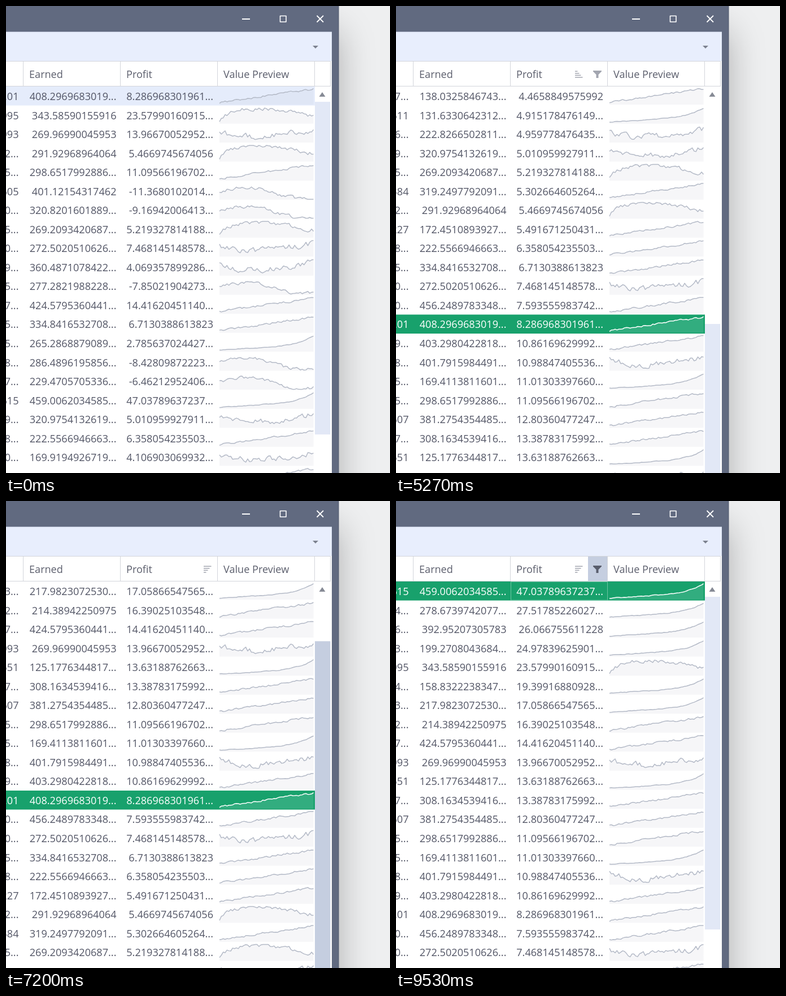
These frames come from a looping animation (680x824 px, 9740 ms). An HTML page with a canvas:

```html
<!DOCTYPE html>
<html lang="en">
<head>
<meta charset="utf-8">
<title>Sorting a data grid</title>
<style>
  html, body { margin: 0; width: 100%; height: 100%; overflow: hidden; background: #eeeff0; }
  canvas { display: block; }
</style>
</head>
<body>
<canvas id="stage" width="680" height="824"></canvas>
<script>
const ctx = document.getElementById('stage').getContext('2d');
const LOOP = 9740;
const ROW_TOP = 142, ROW_HEIGHT = 33.54, VISIBLE_ROWS = 21;
const THUMB_TOP = 169, THUMB_HEIGHT = 587, THUMB_PER_ROW = 19.6;
const GREEN = '#18a16c', HOT = '#c5cee0', LINE = '#d3d5db', ICON = '#a3a6b0';

// Visible cell text: end of the clipped column, earned, profit, sparkline shape.
const cells = `
.01 408.2969683019 8.286968301961 rise
995 343.58590155916 23.57990160915 hump
993 269.96990045953 13.96670052952 dip
2 291.92968964064 5.4669745674056 hump
5 298.6517992886 11.09566196702 rise
605 401.12154317462 -11.3680102014 fall
0 320.8201601889 -9.16942006413 fall
5 269.2093420687 5.219327814188 hump
0 272.5020510626 7.468145148578 dip
9 360.4871078422 4.069357899286 dip
5 277.2821988228 -7.85021904273 fall
7 424.5795360441 14.41620451140 rise
5 334.8416532708 6.7130388613823 rise
5 265.2868879089 2.785637024427 late
8 286.4896195856 -8.42809872223 fall
7 229.4705705336 -6.46212952406 fall
615 459.0062034585 47.03789637237 late
9 320.9754132619 5.010959927911 dip
8 222.5566946663 6.358054235503 rise
0 169.9194926719 4.106903069932 dip
227 172.4510893927 5.491671250431 rise
7 138.0325846743 4.4658849575992 rise
511 131.6330642312 4.915178476149 late
6 222.8266502811 4.959778476435 dip
384 319.2497792091 5.302664605264 rise
0 456.2489783348 7.593555983742 rise
9 403.2980422818 10.86169629992 rise
8 401.7915984491 10.98847405536 dip
5 169.4113811601 11.01303397660 late
607 381.2754354485 12.80360477247 rise
7 308.1634539416 13.38783175992 rise
551 125.1776344817 13.63188762663 late
2 214.38942250975 16.39025103548 rise
3 217.9823072530 17.05866547565 late
4 158.8322238347 19.39916880928 late
3 199.2708043684 24.97839625901 late
6 392.95207305783 26.066755611228 late
4 278.6739742077 27.51785226027 late
7 363.0895288527 4.167434249001 rise
4 248.1360927514 3.518204967315 rise
1 311.7482065193 1.940682753108 dip
8 204.9350718426 0.871936402575 hump
3 352.0617493805 -1.62480759314 fall`;

// Sparkline height in pixels over t = 0..1, with its roughness.
const shapes = {
  late: { jitter: 1.2, height: t => 2 + 10 * t + 15 * t ** 6 },
  rise: { jitter: 3, height: t => 3 + 24 * t },
  hump: { jitter: 6, height: t => 5 + 18 * Math.sin(Math.PI * t ** .65) + 8 * t },
  dip: { jitter: 9, height: t => 21 - 12 * Math.sin(Math.PI * t ** .7) + 2 * t },
  fall: { jitter: 5, height: t => 13 + 9 * Math.sin(1.7 * Math.PI * t) - 3 * t }
};

function seededRandom(seed) {
  let s = seed * 7919 + 17;
  return () => (s = (s * 16807) % 2147483647) / 2147483647;
}

function sparkline(shape, seed) {
  const { jitter, height } = shapes[shape];
  const random = seededRandom(seed);
  let drift = 0;
  return Array.from({ length: 51 }, (_, i) => {
    drift = .5 * drift + jitter * (random() - .5);
    return Math.max(0, Math.min(28, height(i / 50) + drift));
  });
}

const shorten = (value, fits) => value.length < fits ? value + '...' : value;

const rows = cells.trim().split('\n').map((line, i) => {
  const [tail, earned, profit, shape] = line.split(' ');
  return {
    tail: shorten(tail, 3),
    earned: shorten(earned, 15),
    profit: shorten(profit, 15),
    spark: sparkline(shape, i + 1)
  };
});
const descending = [...rows].sort((a, b) => parseFloat(b.profit) - parseFloat(a.profit));

const ASC_FIRST = 29, ASC_OFFSET = 20, DESC_OFFSET = 17;
const dragOffset = step => Math.max(0, Math.round(DESC_OFFSET - 2.2 * Math.max(0, step)));

function stateAt(t) {
  const between = (from, to) => t >= from && t < to;
  const sort = t < 2200 ? 'none' : t < 5600 ? 'asc' : 'desc';
  // While the thumb is dragged, the rows follow one step behind it.
  const step = Math.floor((t - 6863) / 66.7);
  const top = dragOffset(step);
  return {
    sort,
    thumb: { none: 0, asc: ASC_OFFSET, desc: dragOffset(step + 1) }[sort],
    rowAt: i => sort === 'none' ? rows[i] : descending[sort === 'asc' ? ASC_FIRST - i : top + i],
    selected: t < 8330 ? rows[0] : descending[0],
    active: t >= 870,
    cellFocused: t >= 8330,
    headerHover: between(1200, 3330) || between(5270, 6130) || t >= 9530,
    headerPressed: between(2000, 2200) || between(5530, 5600),
    filterHot: t >= 9530,
    thumbHot: between(6470, 7870)
  };
}

function rect(color, x, y, w, h) {
  ctx.fillStyle = color;
  ctx.fillRect(x, y, w, h);
}

function path(points) {
  ctx.beginPath();
  points.forEach(([x, y]) => ctx.lineTo(x, y));
}

function fill(color, ...points) {
  path(points);
  ctx.fillStyle = color;
  ctx.fill();
}

function stroke(color, width, ...points) {
  path(points);
  ctx.strokeStyle = color;
  ctx.lineWidth = width;
  ctx.stroke();
}

function frame(color, x, y, w, h, width = 1) {
  ctx.strokeStyle = color;
  ctx.lineWidth = width;
  ctx.strokeRect(x, y, w, h);
}

function text(value, x, y, color, align = 'left') {
  ctx.fillStyle = color;
  ctx.textAlign = align;
  ctx.fillText(value, x, y);
}

function drawWindow() {
  rect('#eeeff0', 0, 0, 680, 824);
  ctx.save();
  ctx.shadowColor = 'rgba(0,0,0,.27)';
  ctx.shadowBlur = 58;
  ctx.shadowOffsetY = 45;
  rect('#535b6f', -300, 0, 889.5, 1400);
  ctx.restore();
  rect('#616a80', 0, 0, 588.5, 824);
  rect('#e8eefd', 0, 45.5, 577, 52);
  rect('#fff', 0, 97, 577, 727);
  rect('#fff', 418, 22, 14, 2);
  frame('#fff', 485.5, 17.5, 10.5, 10.5, 1.6);
  stroke('#fff', 1.8, [550.5, 17], [562, 28.5]);
  stroke('#fff', 1.8, [562, 17], [550.5, 28.5]);
  fill('#7c818f', [543, 70], [553, 70], [548, 75]);
}

function drawSortIcon(x, largestFirst) {
  for (let i = 0; i < 4; i++) {
    rect(ICON, x, 114.5 + i * 3.5, 4.5 + 3 * (largestFirst ? 3 - i : i), 1.5);
  }
}

function drawHeader(state) {
  if (state.headerPressed) rect('#e4eaf8', 203, 98, 171, 43);
  if (state.filterHot) rect(HOT, 340, 98, 34, 43);
  for (const y of [97, 141]) rect(LINE, 0, y, 575, 1);
  for (const x of [30, 202, 374, 546, 574]) rect(LINE, x, 98, 1, 43);
  text('Earned', 41, 127, '#5b5e6c');
  text('Profit', 213, 127, '#5b5e6c');
  text('Value Preview', 385, 127, '#5b5e6c');
  if (state.headerHover) {
    fill(state.filterHot ? '#595d6c' : ICON, [349, 114], [364, 114], [364, 115.5],
      [358.5, 121], [358.5, 127], [354.5, 127], [354.5, 121], [349, 115.5]);
  }
  if (state.sort !== 'none') drawSortIcon(state.headerHover ? 317 : 350, state.sort === 'desc');
}

function drawRow(row, i, state) {
  const top = ROW_TOP + i * ROW_HEIGHT;
  const selected = row === state.selected;
  const green = selected && state.active;
  if (selected) rect(green ? GREEN : '#e5ecfb', 0, top, 547, ROW_HEIGHT);

  const points = row.spark.map((height, k) => [378 + k * 3.33, top + 31.3 - height]);
  const area = green ? '#32ad7f' : selected ? '#dfe6f5' : '#f6f6f8';
  fill(area, ...points, [544.5, top + 32], [378, top + 32]);
  stroke(green ? '#fff' : '#b4bac7', 1.5, ...points);
  if (green && state.cellFocused) frame('#6cc5a3', 203.5, top + .5, 171, ROW_HEIGHT - 1);

  const color = green ? '#fff' : '#535666';
  const baseline = Math.round(top + 24);
  text(row.tail, 22.5, baseline, color, 'right');
  text(row.earned, 195.5, baseline, color, 'right');
  text(row.profit, 367, baseline, color, 'right');
}

function drawScrollbar(state) {
  rect('#fff', 547, 142, 30, 682);
  fill('#868a95', [554.5, 160], [560, 152], [565.5, 160]);
  const y = THUMB_TOP + state.thumb * THUMB_PER_ROW;
  rect(state.thumbHot ? HOT : '#e2e8f6', 547, y, 27.5, THUMB_HEIGHT);
}

function draw(now) {
  const state = stateAt(now % LOOP);
  ctx.font = '18.1px "Open Sans", "Noto Sans", sans-serif';
  ctx.lineJoin = 'round';
  drawWindow();
  for (let i = 0; i < VISIBLE_ROWS; i++) drawRow(state.rowAt(i), i, state);
  drawScrollbar(state);
  drawHeader(state);
  requestAnimationFrame(draw);
}

requestAnimationFrame(draw);
</script>
</body>
</html>
```
